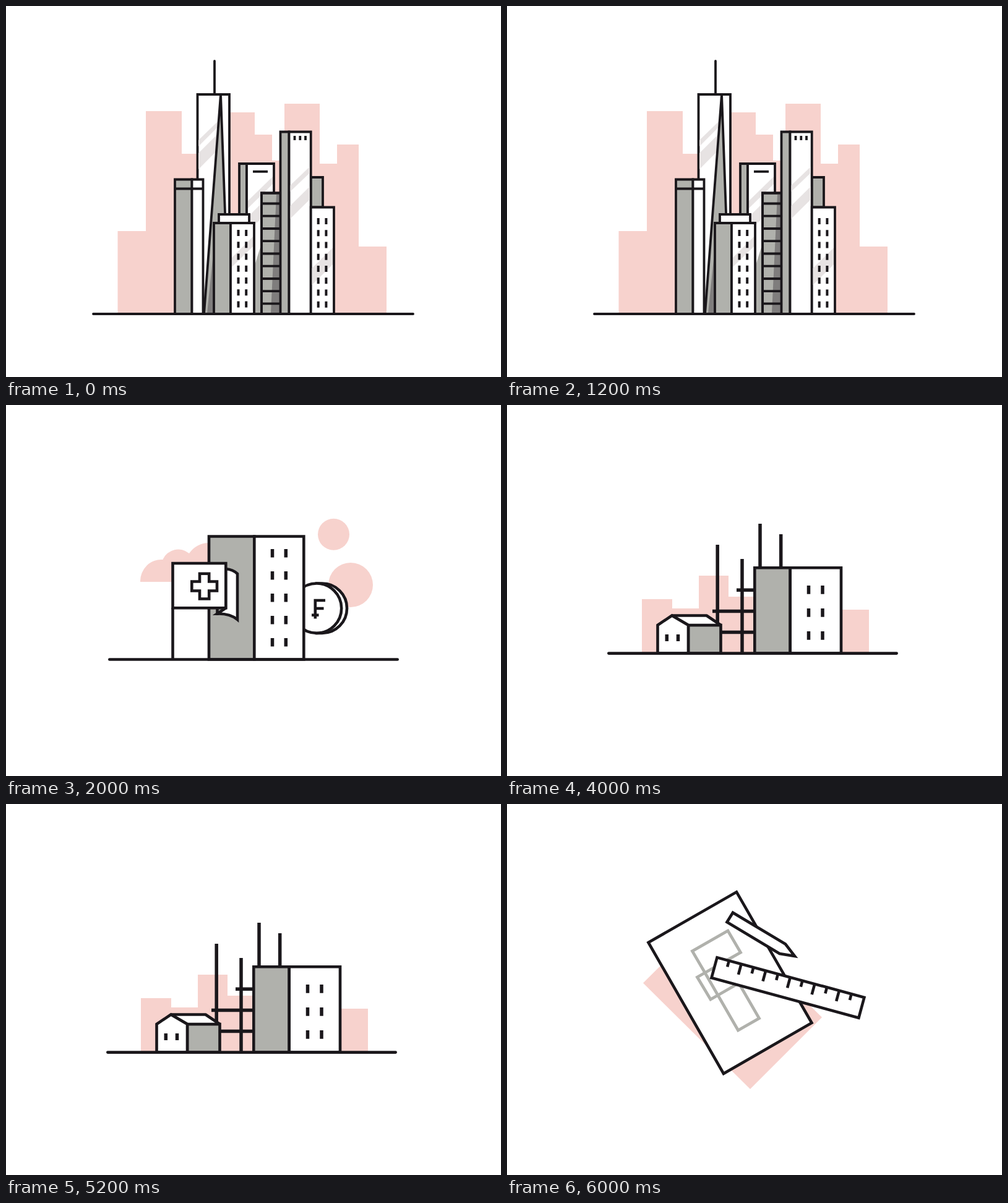
Write an HTML page that moves like this. It is 800 by 600 pixels and loops after 8 s.

```html
<!DOCTYPE html>
<html lang="en">
<head>
<meta charset="utf-8">
<title>City sketches</title>
<style>
  html, body { margin: 0; width: 100%; height: 100%; overflow: hidden; background: #fff; }
  svg { display: block; width: 100vw; height: 100vh; }
  .scene { visibility: hidden; animation: show 8s step-end infinite; }
  .clinic { animation-delay: -6s; }
  .factory { animation-delay: -4s; }
  .plan { animation-delay: -2s; }
  @keyframes show {
    0% { visibility: visible; }
    25%, 100% { visibility: hidden; }
  }
  .ink { fill: none; stroke: #1a171b; stroke-width: 4.6; }
  .city .ink { stroke-width: 3.8; }
  .ink .w { fill: #fff; }
  .ink .g { fill: #b0b1ac; }
  .ink .beam { stroke-width: 5.5; }
  .ink .round { stroke-linecap: round; }
  .city .win { stroke-width: 4; stroke-dasharray: 10 9.25; }
  .clinic .win { stroke-width: 5.5; stroke-dasharray: 13.5 22.5; }
  .factory .win { stroke-width: 5.5; stroke-dasharray: 13.7 23.3; }
  .pink { fill: #f7d2cd; }
  .shine { fill: #e7e3e3; stroke: none; }
  .dark { fill: #7f7d7d; stroke: none; }
  .draft { fill: none; stroke: #b0b1ac; stroke-width: 4.8; }
</style>
</head>
<body>
<svg viewBox="0 0 800 600">

  <g class="scene city">
    <path class="pink" d="M180.500 498V364H226V170H284V239H330V172H402V208H430V250H450V158H507V255H535V224H570V389H615V498Z"/>
    <g class="ink">
      <!-- tower -->
      <path class="round" d="M337 89V143"/>
      <path class="w" d="M309.500 143H361V498H309.500Z"/>
      <path class="shine" d="M311 217L345 184V193L311 227ZM311 238L344 205V231L311 264Z"/>
      <path class="g" d="M347 143L320 498H360Z" stroke-linejoin="bevel"/>
      <path class="dark" d="M325 497L337 380V497Z"/>

      <path class="g" d="M273 280.500H300.500V498H273Z"/>
      <path class="w" d="M300.500 280.500H318.500V498H300.500Z"/>
      <path d="M273 295.500H318.500"/>

      <path class="g" d="M377 255H389V498H377Z"/>
      <path class="w" d="M389 255H433V498H389Z"/>
      <path class="shine" d="M391 315L431 276V288L391 327ZM391 341L411 321V345L391 365Z"/>
      <path class="g" d="M402 419L412 387V497H402Z" stroke="none"/>
      <path d="M399 267.800H423"/>

      <path class="g" d="M336 351H363V498H336Z"/>
      <path class="w" d="M363 351H401V498H363Z"/>
      <path class="shine" d="M365 407L399 373V389L365 422Z"/>
      <path class="w" d="M344 337H393V351H344Z"/>
      <path class="win" d="M375.500 362V488M388.200 362V488"/>

      <path class="g" d="M413 302.500H444V498H413Z"/>
      <path class="dark" d="M437 304.400H444V497H428Z"/>
      <path d="M413 302.500H444V498H413ZM413 319.500H444M413 339.700H444M413 360H444M413 380.200H444M413 400.500H444M413 420.700H444M413 441H444M413 461.200H444M413 481.400H444"/>

      <path class="g" d="M492.500 277H512V325.500H492.500Z"/>
      <path class="g" d="M443.500 203.500H457.500V498H443.500Z"/>
      <path class="w" d="M457.500 203.500H492.700V498H457.500Z"/>
      <path class="shine" d="M459.400 290L490.800 260V270L459.400 300ZM459.400 323L490.800 292V313L459.400 344Z"/>
      <path d="M466.500 210V217M475.300 210V217M484 210V217"/>

      <path class="w" d="M492.700 325.500H530V498H492.700Z"/>
      <path class="shine" d="M494.600 424L528 391V418L494.600 451Z"/>
      <path class="win" d="M504.700 343V488M517.400 343V488"/>

      <path class="round" d="M141 498H658"/>
    </g>
  </g>

  <g class="scene clinic">
    <g class="pink">
      <path d="M217 286A34 35 0 0 1 253.500 250A27 27 0 0 1 296 240A38 38 0 0 1 328 223V286Z"/>
      <circle cx="529.500" cy="209.300" r="25.500"/>
      <circle cx="557" cy="291" r="36"/>
    </g>
    <g class="ink">
      <path class="w" d="M502 288.500H511A40 40.200 0 0 1 511 369H502Z"/>
      <circle class="w" cx="502" cy="328.700" r="40.200"/>
      <path d="M516 316H499.800V345.500M500 329H513.500M494 339.700H505.500"/>
      <path class="g" d="M328 212.500H401.300V411.500H328Z"/>
      <path class="w" d="M401.300 212.500H481.300V411.500H401.300Z"/>
      <path class="win" d="M430.500 233V391M452.300 233V391"/>
      <path class="w" d="M355 265Q367 266 374 273V347Q362 337 341.500 337.500L355 328.500Z"/>
      <path d="M341.500 328V340"/>
      <path class="w" d="M269.500 256H355.300V328.300H269.500Z"/>
      <path d="M269.500 328V411.500"/>
      <path d="M313 272.700H328.200V285.500H341V300.500H328.200V313.500H313V300.500H300.300V285.500H313Z"/>
      <path class="round" d="M167.300 411.500H632.700"/>
    </g>
  </g>

  <g class="scene factory">
    <path class="pink" d="M218 401V314H267V329H310V276H358V310H400V401ZM540 331H585V401H540Z"/>
    <g class="ink">
      <path class="beam" d="M340.200 226V352M380 249V401M409 192V263M442.700 209V263M371 299.300H400M332 333.500H400M346 367.500H400"/>
      <path class="g" d="M400.300 263.300H457.700V401.500H400.300Z"/>
      <path class="w" d="M457.700 263.300H540V401.500H457.700Z"/>
      <path class="win" d="M487.500 292V380M510 292V380"/>
      <path class="g" d="M293 356H345.500V401.500H293Z"/>
      <path class="w" d="M266.500 340.500H322.500L345.500 356H293Z" stroke-linejoin="bevel"/>
      <path class="w" d="M243.500 401.500V356L266.500 340.500L293 356V401.500Z"/>
      <path class="beam" d="M258.300 371V382M276.500 371V382"/>
      <path class="round" d="M164.300 401.600H629.700"/>
    </g>
  </g>

  <g class="scene plan">
    <path class="pink" d="M220 289.500L393 461L509 345L336 174Z"/>
    <g class="ink">
      <path class="w" d="M228.500 224L371 142.300L492.500 354L350 436Z"/>
    </g>
    <path class="draft" d="M320 273L299.500 238L357 205L377.500 240L307.500 280L329 316L376 289M320 273L373.500 366L407.500 346.500L376 292"/>
    <g class="ink">
      <path class="w" d="M355.500 191L365 175.700L450 226.500L465 246L440.500 242Z"/>
      <g transform="translate(339.500 248.200) rotate(15.200)">
        <path class="w" d="M0 0H246.500V34.200H0Z"/>
        <path d="M20 0V15M40.500 0V26M61 0V15M81.500 0V26M102 0V15M122.500 0V26M143 0V15M163.500 0V26M184 0V15M204.500 0V26M225 0V15" transform="scale(1 .68)"/>
      </g>
    </g>
  </g>

</svg>
</body>
</html>
```
